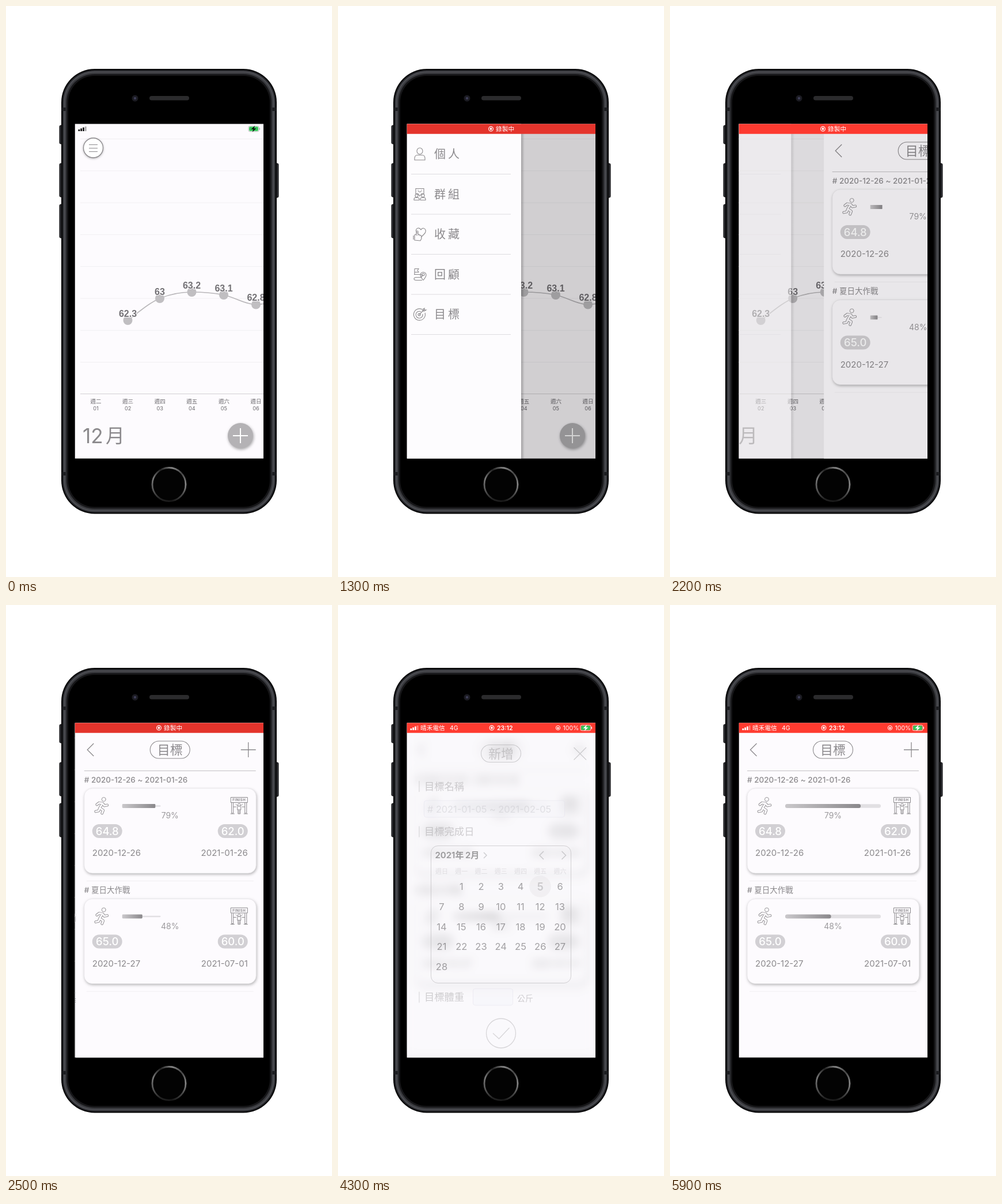
Recreate the animation shown at these times as an HTML page with a canvas. Size 566 by 990 pixels, loop 6000 ms.

```html
<!DOCTYPE html>
<html lang="zh-Hant">
<head>
<meta charset="utf-8">
<style>
html, body { margin: 0; height: 100%; overflow: hidden; background: #fff; }
canvas { display: block; }
</style>
</head>
<body>
<canvas id="stage" width="566" height="990"></canvas>
<script>
const canvas = document.getElementById('stage');
const ctx = canvas.getContext('2d');
const FONT = 'Inter, "Noto Sans CJK TC", "Noto Sans CJK JP", sans-serif';
const GRAY = '#8b898c', PAPER = '#fdfbfe';
const LOOP = 6000, STEP = 100;
const LEFT = 119.5, TOP = 204.3, WIDTH = 327.5, HEIGHT = 580.4;

const clamp = v => Math.min(1, Math.max(0, v));
const ramp = (t, a, b) => clamp((t - a) / (b - a));
const smooth = v => v * v * (3 - 2 * v);
// Critically damped spring, from 0 to 1
const spring = (t, start, rate) => {
  const x = Math.max(0, t - start) / 1000 * rate;
  return 1 - (1 + x) * Math.exp(-x);
};

function layer(draw, { x = 0, y = 0, alpha = 1 } = {}) {
  ctx.save();
  ctx.translate(x, y);
  ctx.globalAlpha *= alpha;
  draw();
  ctx.restore();
}

function stroke(d, color = GRAY, width = 1.2) {
  ctx.strokeStyle = color;
  ctx.lineWidth = width;
  ctx.stroke(new Path2D(d));
}

function paint(fill, line, width) {
  if (fill) { ctx.fillStyle = fill; ctx.fill(); }
  ctx.shadowColor = 'transparent';
  if (line) { ctx.strokeStyle = line; ctx.lineWidth = width; ctx.stroke(); }
}

function box(x, y, w, h, r, fill, line, width = 1) {
  ctx.beginPath();
  ctx.roundRect(x, y, w, h, r);
  paint(fill, line, width);
}

function disc(x, y, r, fill, line, width = 1.2) {
  ctx.beginPath();
  ctx.arc(x, y, r, 0, 7);
  paint(fill, line, width);
}

function shadow(blur, dx, dy, color) {
  ctx.shadowBlur = blur;
  ctx.shadowOffsetX = dx;
  ctx.shadowOffsetY = dy;
  ctx.shadowColor = color;
}

function fade(x0, x1, from, to) {
  const gradient = ctx.createLinearGradient(x0, 0, x1, 0);
  gradient.addColorStop(0, from);
  gradient.addColorStop(1, to);
  return gradient;
}

function text(str, x, y, size, { color = GRAY, align = 'left', weight = 400, family = FONT, spacing = 0, halo } = {}) {
  ctx.font = `${weight} ${size}px ${family}`;
  ctx.letterSpacing = spacing + 'px';
  ctx.textAlign = align;
  const base = y + size * 0.365;
  if (halo) {
    ctx.strokeStyle = halo;
    ctx.lineWidth = 2;
    ctx.strokeText(str, x, base);
  }
  ctx.fillStyle = color;
  ctx.fillText(str, x, base);
}

function phone() {
  for (const [x, y, h] of [[93, 207, 32], [93, 273, 58], [93, 344, 58], [466, 273, 59]])
    box(x, y, 7, h, 2, '#2c2d30', '#0c0c0e');
  const shells = [[0, '#060607'], [2, '#242529'], [4, '#4a4b50'], [6.5, '#38393d'], [9, '#161618'], [12, '#000']];
  for (const [i, color] of shells)
    box(96 + i, 109 + i, 374 - 2 * i, 771.5 - 2 * i, 58 - i, color);
  for (const y of [176, 808])
    for (const x of [97, 462]) box(x, y, 7, 6, 0, '#1c1d20');
  box(249, 156, 69, 7.5, 4, '#2b2b2d');
  disc(224, 160, 5.5, '#1b1b22');
  disc(224, 160, 2.2, '#3d3d55');
  const ring = ctx.createConicGradient(0, 283, 829);
  ['#888', '#444', '#181818', '#222', '#555', '#777', '#222', '#888', '#444', '#888']
    .forEach((c, i) => ring.addColorStop(i / 9, c));
  disc(283, 829.5, 29, '#030303', ring, 2.8);
}

const points = [[211.5, 545, -.75, '62.3'], [267, 507, -.42, '63'], [322.5, 496, 0, '63.2'],
  [378, 501, .2, '63.1'], [434, 517.5, 0, '62.8'], [489.5, 507, -.2, '63']];

function chart() {
  box(LEFT, TOP, WIDTH + 100, HEIGHT, 0, PAPER);
  for (let i = 0; i < 8; i++) stroke(`M129 ${230.5 + i * 55.3}H560`, '#f1eff2', 1);
  stroke('M129 672.5H560', '#d3d1d4', 1);

  let d = 'M211.5 545';
  for (let i = 1; i < points.length; i++) {
    const [x0, y0, m0] = points[i - 1], [x, y, m] = points[i];
    d += `C${x0 + 18.5} ${y0 + 18.5 * m0} ${x - 18.5} ${y - 18.5 * m} ${x} ${y}`;
  }
  stroke(d, '#b9b7ba', 1.6);
  for (const [x, y, , label] of points) {
    disc(x, y, 8, '#c0bec1');
    text(label, x, y - 12, 16, { color: '#737175', align: 'center', weight: 700,
      family: '"Liberation Sans", Arial, sans-serif', halo: PAPER });
  }
  [...'二三四五六日一'].forEach((day, i) => {
    const x = 156 + 55.6 * i, style = { color: '#6d6b6f', align: 'center' };
    text('週' + day, x, 686, 9.5, style);
    text('0' + (i + 1), x, 698, 9.2, style);
  });
  text('12', 133, 745, 35);
  text('月', 173, 745, 33);

  layer(() => {
    shadow(5, 1, 2, 'rgba(0,0,0,.35)');
    disc(407, 745, 22, '#b4b2b5');
    stroke('M394 745h26M407 732v26', '#fff', 2);
  });
  layer(() => {
    shadow(4, 0, 1, 'rgba(0,0,0,.4)');
    disc(151.5, 246, 17, '#fff', GRAY, 1.3);
    stroke('M144 240.5h15M144 246.5h15M144 252.5h15', GRAY, 1);
  });
}

const person = (x, y, s) =>
  `M${x - s * .5} ${y - s * .55}a${s * .5} ${s * .55} 0 1 1 ${s} 0a${s * .5} ${s * .55} 0 1 1 ${-s} 0` +
  `M${x - s * .9} ${y + s}v${-s * .25}q0 ${-s * .6} ${s * .5} ${-s * .6}h${s * .8}q${s * .5} 0 ${s * .5} ${s * .6}v${s * .25}z`;

const menuItems = [
  ['個人', person(0, 0, 10)],
  ['群組', person(-5.5, 5, 5) + person(5.5, 5, 5) + 'M-7-10H7V-1H3L0 3-3-1H-7zM-3-6q3 4 6 0M-3-8v1M3-8v1'],
  ['收藏', 'M-4-2C-11-8-2-15 2-8C6-15 15-7 7 0L2 5M-9 10v-9q2-2 3 0v-6q2-2 3 0v6q2-2 3 0v1q2-1 3 1v4l-2 4zM-11 2v7'],
  ['回顧', 'M-9-10V0M-9-10h7l-2 3 2 3h-7M-10 0H1q3 0 3 2.5t-3 2.5H-6q-4 0-4 2.5t4 2.5H4M6 10q-5-6-5-9a5 5 0 0 1 10 0q0 3-5 9M4 0a2 2 0 1 1 4 0a2 2 0 1 1-4 0'],
  ['目標', 'M4-9A10 10 0 1 0 9-3M2-5A6 6 0 1 0 5-1M-3 0a2 2 0 1 0 4 0a2 2 0 1 0-4 0M-1 0L8-9M5-6V-9L8-11V-8H11L8-6z'],
];

function menu(contentAlpha) {
  box(LEFT, TOP, 318 - LEFT, HEIGHT, 0, '#fdfcfe');
  box(318, TOP, 6, HEIGHT, 0, fade(318, 324, 'rgba(0,0,0,.22)', 'rgba(0,0,0,0)'));
  menuItems.forEach(([label, icon], i) => {
    const y = 257 + i * 69.5;
    stroke(`M127 ${y + 34.5}H300`, '#dedce0', 1);
    layer(() => {
      text(label, 167, y, 20, { spacing: 4 });
      ctx.translate(142, y);
      stroke(icon, GRAY, 1.1);
    }, { alpha: contentAlpha });
  });
}

function runner() {
  const limbs = 'M-8-2L-4-5L2-4L5 0L10-1M1-3L-3 4L3 8L1 13M-3 4L-5 9L-10 10';
  ctx.lineCap = ctx.lineJoin = 'round';
  stroke(limbs, '#99979a', 4.8);
  stroke(limbs, PAPER, 2.8);
  disc(4, -11, 3.5, PAPER, '#99979a', 1);
}

function finishGate() {
  stroke('M-14.5-14.5h29v9h-29zM-13-5v18h3v-18M10-5v18h3v-18M-15 14h7M8 14h7M-10 2h5M5 2h5' +
    'M-6-3q3 4 6 4t6-4M-3 1v6h6v-6M-2 7v7h2v-6M2 7v7h-2', GRAY, 1);
  disc(0, -1.5, 2.3, PAPER, GRAY, 1);
  text('FINISH', 0, -10, 6, { weight: 700, align: 'center', spacing: .5 });
}

function badge(label, x, y) {
  box(x, y - 12, 52, 24, 12, '#d2d0d4');
  text(label, x + 26, y, 18.5, { color: '#fff', align: 'center', weight: 500 });
}

function goalCard(y, title, percent, ratio, from, to, t) {
  text(title, 134, y - 15, 13.5, { weight: 500 });
  layer(() => {
    shadow(5, 1, 2, 'rgba(0,0,0,.3)');
    box(134, y, 298.5, 147, 14, PAPER, '#e6e4e7', .7);
  });
  layer(runner, { x: 164, y: y + 30 });
  layer(finishGate, { x: 403, y: y + 30 });

  const track = ramp(t, 2070, 3140), fill = 166 * ratio * ramp(t, 2030, 3100);
  box(200, y + 30.5 - 3.3 * track, 166 * track, 6.6 * track, 3.3 * track, '#e2e0e3');
  box(200, y + 27, fill, 7, 3.5 * track, fade(200, 200.1 + fill, '#cac8cb', '#8a888b'));

  text(percent, 283, y + 47, 14, { color: '#9c9a9d', align: 'center' });
  badge(from[0], 148, y + 74);
  badge(to[0], 366, y + 74);
  text(from[1], 148, y + 112, 15);
  text(to[1], 418, y + 112, 15, { align: 'right' });
  stroke(`M138 ${y + 160.5}H428`, '#f0eef1', 1);
}

function titlePill(label, y) {
  box(248.5, y - 15, 69, 30, 15, null, GRAY, 1.1);
  text(label, 283, y, 22, { align: 'center' });
}

function goals(t) {
  box(LEFT, TOP, WIDTH, HEIGHT, 0, PAPER);
  stroke('M150.5 240L139.5 251L150.5 262M406 251h26M419 238v26', GRAY, 1.3);
  titlePill('目標', 251);
  stroke('M134 287.5H432', '#c3c1c4', 1);
  goalCard(318, '# 2020-12-26 ~ 2021-01-26', '79%', .79, ['64.8', '2020-12-26'], ['62.0', '2021-01-26'], t);
  goalCard(509.5, '# 夏日大作戰', '48%', .48, ['65.0', '2020-12-27'], ['60.0', '2021-07-01'], t);
}

function fieldLabel(label, y) {
  stroke(`M141 ${y - 9.5}v19`, '#bcbabd', 1.6);
  text(label, 150, y, 17.3);
}

function newGoal() {
  box(LEFT, TOP, WIDTH, HEIGHT, 0, 'rgba(245,243,246,.93)');
  titlePill('新增', 257.5);
  stroke('M409.5 247l21.5 21.5M431 247l-21.5 21.5', GRAY, 1.2);
  fieldLabel('目標名稱', 314.5);
  box(149.5, 339, 244, 29, 4, '#f2f1f8', '#dddce8');
  text('# 2021-01-05 ~ 2021-02-05', 155, 354, 16.3, { color: '#c0bec5' });
  fieldLabel('目標完成日', 393);

  box(161.5, 417.5, 243, 238, 12, null, '#969498');
  text('2021年\u20092月', 168.5, 434, 15, { color: '#111', weight: 600 });
  stroke('M253 429l5 5-5 5M357 427l-7 7 7 7M388.5 427l7 7-7 7', GRAY, 1.5);
  [...'日一二三四五六'].forEach((day, i) =>
    text('週' + day, 180 + 34.25 * i, 462, 11, { color: '#bdbbc0', align: 'center' }));
  disc(351, 488, 18.7, '#e2e0e4');
  for (let day = 1; day <= 28; day++) {
    const chosen = day === 5;
    text(day, 180 + 34.25 * (day % 7), 488 + 34.75 * Math.floor(day / 7), chosen ? 18 : 16.5,
      { align: 'center', color: chosen ? GRAY : '#1b1a1c', weight: chosen ? 600 : 400 });
  }

  fieldLabel('目標體重', 680);
  box(234.5, 665, 69, 29, 4, '#f2f1f8', '#dddce8');
  text('公斤', 311, 682, 14);
  disc(283, 742.5, 25.5, null, '#a19fa2', 1.3);
  stroke('M269 742.5l10.5 9.500 18-19', '#a19fa2', 1.3);
}

function signalAndBattery(color, rim) {
  for (let i = 0; i < 4; i++)
    layer(() => box(125.5 + i * 3.8, 214 - i * 1.7, 2.7, 3 + i * 1.7, .5, color), { alpha: i < 3 ? 1 : .35 });
  box(421, 208.2, 18, 9.6, 2.5, null, rim, .8);
  box(422.1, 209.3, 15.8, 7.4, 1.6, '#35c759');
  box(439.6, 211, 1.4, 4, .7, rim);
  ctx.fillStyle = color;
  ctx.fill(new Path2D('M432 207.5L425.5 213.8H429.3L427.8 218.5L434.5 212.2H430.6z'));
}

function recordMark(x) {
  disc(x, 213, 3.9, null, '#fff', 1.1);
  disc(x, 213, 1.9, '#fff');
}

function statusBar(t) {
  const white = { color: '#fff' };
  const red = smooth(ramp(t, 100, 400)), full = smooth(ramp(t, 2900, 3300));
  layer(() => signalAndBattery('#111', '#b0b0b0'), { alpha: 1 - red });
  // The red bar dims briefly now and then
  const dip = [1300, 2500, 4900].reduce((sum, c) => sum + Math.exp(-(((t - c) / 190) ** 2)), 0);
  layer(() => {
    box(LEFT, TOP, WIDTH, 17.5, 0, `rgb(${255 - 27 * dip},${59 - 7 * dip},${48 - 4 * dip})`);
    layer(() => {
      recordMark(265.5);
      text('錄製中', 274, 213, 10.7, white);
    }, { alpha: 1 - full });
    layer(() => {
      signalAndBattery('#fff', '#fff');
      text('晴禾電信', 143, 213, 10.7, white);
      text('4G', 194, 213, 10.5, white);
      recordMark(267);
      text('23:12', 276, 213, 10.5, { color: '#fff', weight: 600 });
      disc(382, 213, 3.7, null, '#fff', 1);
      box(380.4, 212, 3.2, 2.8, .5, '#fff');
      text('100%', 390.5, 213, 10.5, white);
    }, { alpha: full });
  }, { alpha: red });
}

function blurScreen(radius) {
  const area = [LEFT, TOP, WIDTH, HEIGHT];
  layer(() => {
    ctx.filter = `blur(${radius}px)`;
    ctx.drawImage(canvas, ...area, ...area);
  });
}

function screen(t) {
  const opened = 1 - (1 - ramp(t, 850, 1250)) ** 3;
  const pushed = spring(t, 2100, 18.4);
  const dim = .175 * opened * (1 - pushed);
  const veil = alpha => box(LEFT, TOP, WIDTH, HEIGHT, 0, `rgba(0,0,0,${alpha})`);

  if (t < 2800) {
    layer(chart, { x: -98 * pushed });
    veil(dim);
    veil(.1 * pushed);
    if (opened > 0)
      layer(() => menu(clamp(1 - 2 * pushed)),
        { x: -205 * (1 - opened) - 196 * pushed, alpha: 1 - .9 * pushed });
  }
  if (pushed > 0)
    layer(() => {
      goals(t);
      veil(dim);
    }, { x: WIDTH * (1 - pushed) });

  const modal = smooth(ramp(t, 4150, 4500)) * (1 - smooth(ramp(t, 5200, 5600)));
  if (modal > 0) {
    blurScreen(20 * modal);
    layer(newGoal, { alpha: modal });
  }
  statusBar(t);
}

function frame() {
  const t = Math.floor(performance.now() / STEP) * STEP % LOOP;
  ctx.fillStyle = '#fff';
  ctx.fillRect(0, 0, 566, 990);
  phone();
  layer(() => {
    ctx.beginPath();
    ctx.rect(LEFT, TOP, WIDTH, HEIGHT);
    ctx.clip();
    screen(t);
  });
  requestAnimationFrame(frame);
}
frame();
</script>
</body>
</html>
```
